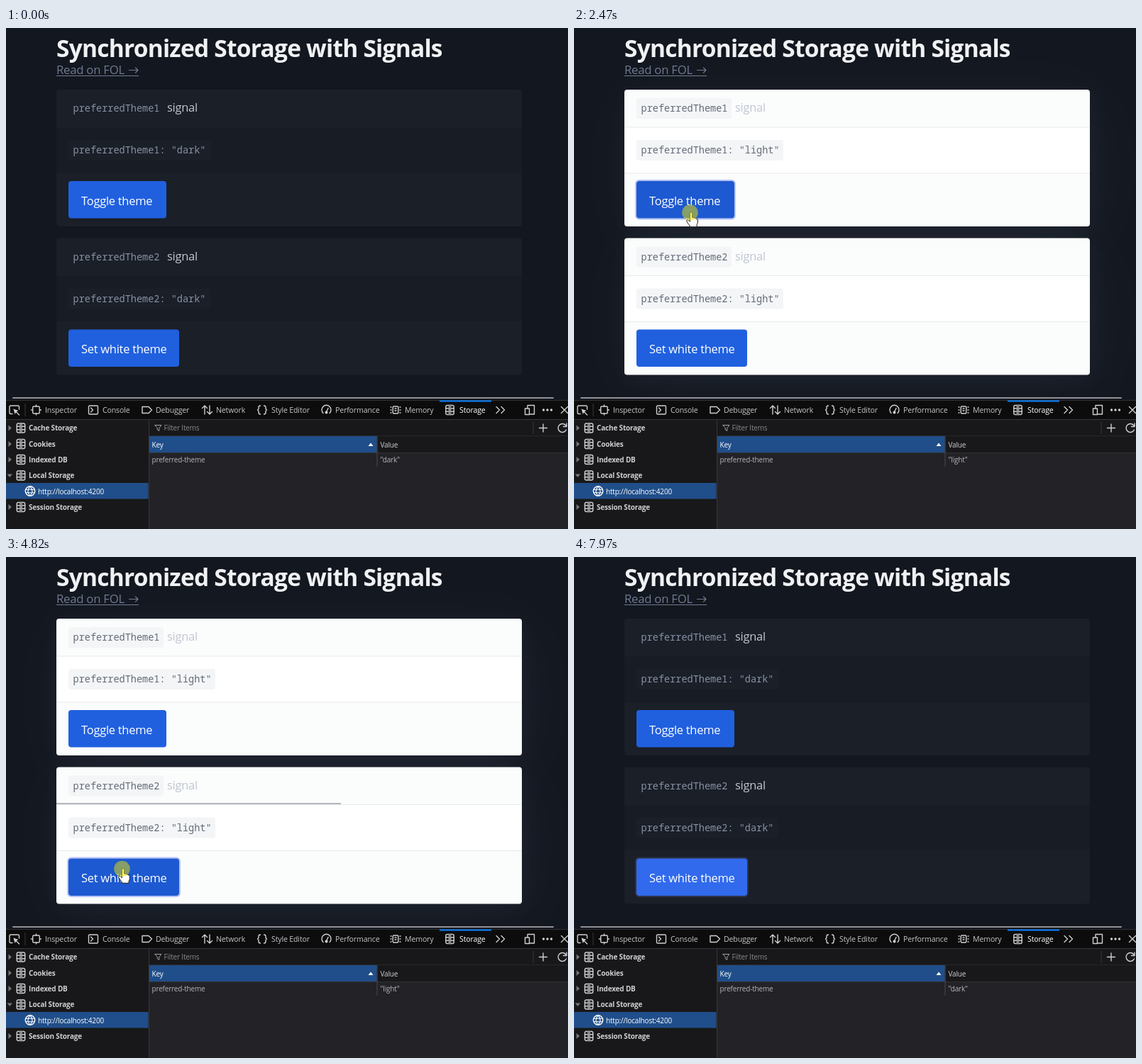
Animation of 792x707 px, one loop 8040 ms. Source, as an HTML page:

```html
<!DOCTYPE html>
<html lang="en">
<head>
<meta charset="utf-8">
<title>Synchronized Storage with Signals</title>
<style>
  html, body { margin: 0; width: 100%; height: 100%; overflow: hidden; background: #13171f; }
  svg { display: block; }
  text { white-space: pre; }
  .ui { font-family: "Open Sans", "Noto Sans", sans-serif; font-size: 16.5px; letter-spacing: -.28px; }
  .title { font-size: 33.5px; font-weight: 700; letter-spacing: -.77px; fill: #f0f1f3; }
  .mono { font-family: "Noto Sans Mono", "DejaVu Sans Mono", monospace; font-size: 13.55px; }
  .tab { font-size: 10.6px; letter-spacing: -.16px; fill: #c6c6c9; }
  .small { font-size: 10px; letter-spacing: -.18px; fill: #b5b5b8; }
  .bold { font-weight: 700; fill: #cfcfd2; }
  .icon { fill: none; stroke: #cfcfd2; stroke-width: 1.4; stroke-linejoin: round; stroke-linecap: round; }
  .solid { fill: #cfcfd2; stroke: none; }
</style>
</head>
<body>
<svg id="stage" width="792" height="707" viewBox="0 0 792 707">
  <defs>
    <filter id="wide" x="-40%" y="-100%" width="180%" height="300%"><feGaussianBlur stdDeviation="48"/></filter>
    <filter id="near" x="-20%" y="-40%" width="140%" height="180%"><feGaussianBlur stdDeviation="16"/></filter>
  </defs>
  <rect width="792" height="707" fill="#13171f"/>
  <g id="page"></g>
  <g id="tools"></g>
  <g id="cursor" stroke="#15171c" stroke-width="1" stroke-linejoin="round" fill="#fff">
    <path id="hand" d="M-1.7 1.7a1.7 1.7 0 0 1 3.4 0V7.6q3-.7 3.2.8q2.2-.5 2.4.9q2-.2 2 1.7V14q0 2-1.2 3.8V20.7H-1.8V19Q-4 16.5-6 13q-.9-2.2.8-2.4q1.2 0 3.5 2.6z"/>
    <path id="arrow" d="M0 0V15.5L3.6 12.2 6 17.5 8.3 16.5 6 11.4H10.8z"/>
  </g>
  <circle id="click" r="11.3" fill="#efe300" fill-opacity=".5"/>
</svg>
<script>
const LOOP = 8040;
const FADE = 200;
const $ = id => document.getElementById(id);
const set = (el, attrs) => { for (const k in attrs) el.setAttribute(k, attrs[k]); };
const show = (el, on) => el.setAttribute('visibility', on ? 'visible' : 'hidden');
const clamp = v => Math.max(0, Math.min(1, v));
const within = (t, spans) => spans.some(([a, b]) => t >= a && t < b);

const text = (x, y, cls, s, extra = '') => `<text x="${x}" y="${y}" class="${cls}" ${extra}>${s}</text>`;
const rect = (x, y, w, h, fill, extra = '') => `<rect x="${x}" y="${y}" width="${w}" height="${h}" fill="${fill}" ${extra}/>`;
const path = (d, cls = 'icon', extra = '') => `<path d="${d}" class="${cls}" ${extra}/>`;
const at = (x, y, content) => `<g transform="translate(${x} ${y})">${content}</g>`;

// Web page
const THEMES = {
  dark: { head: '#1a1f28', body: '#181c25', code: '#1a1f28', ink: '#8891a4', rule: '#1a1f28', signal: '#c2c7d0' },
  light: { head: '#fbfcfc', body: '#ffffff', code: '#f3f5f7', ink: '#646b79', rule: '#e7eaee', signal: '#c0c6d2' }
};

function card(n, y, label, buttonWidth) {
  const name = 'preferredTheme' + n;
  return at(0, y, `
    ${rect(71, 0, 656, 193, '', 'rx="4" data-fill="head"')}
    ${rect(71, 53, 656, 65, '', 'data-fill="body"')}
    ${rect(71, 52.5, 656, 1, '', 'data-fill="rule"')}
    ${rect(71, 117.5, 656, 1, '', 'data-fill="rule"')}
    ${rect(88, 12, 134, 29, '', 'rx="4" data-fill="code"')}
    ${text(94.5, 31, 'mono', name, 'data-fill="ink"')}
    ${text(227, 31, 'ui', 'signal', 'data-fill="signal"')}
    ${rect(88, 71, 200, 29, '', `rx="4" data-fill="code" id="box${n}"`)}
    ${text(94.5, 90, 'mono', '', `data-fill="ink" id="value${n}"`)}
    ${rect(87.1, 128.1, buttonWidth + 1.8, 54.3, 'none', `rx="4.5" stroke-width="2" id="ring${n}"`)}
    ${rect(88, 129, buttonWidth, 52.5, '#2060df', `rx="4" id="button${n}"`)}
    ${text(106, 162.5, 'ui', label, 'fill="#fff"')}`);
}

const glow = y =>
  rect(79, y + 14, 656, 193, '#8191b5', 'opacity=".07" filter="url(#wide)"') +
  rect(74, y + 5, 656, 193, '#8191b5', 'opacity=".06" filter="url(#near)"');

$('page').innerHTML = `
  <g id="glow">${glow(87)}${glow(296.5)}</g>
  ${text(71, 41, 'ui title', 'Synchronized Storage with Signals')}
  ${text(71, 65, 'ui', 'Read on FOL', 'fill="#6f7991" style="font-size:16.8px"')}
  ${path('M173.500 59.500H186M182.500 56L186 59.500L182.500 63', 'icon', 'style="stroke:#6f7991;stroke-width:1.2"')}
  ${rect(71, 67, 116, 1, '#6f7991')}
  ${card(1, 87, 'Toggle theme', 138)}
  ${card(2, 296.5, 'Set white theme', 156)}
  ${rect(71, 347.5, 401, 1, '#6e7278', 'id="streak"')}`;

// Developer tools panel
const disk = '<rect class="icon" x="-5.700" y="-6.500" width="11.400" height="13" rx="2"/>' +
  path('M-5.700-2.200H5.700M-5.700 2.200H5.700M-1.500-4.400H1.500M-1.500 0H1.500M-1.500 4.400H1.500');
const chip = w => `<rect class="icon" x="${-w}" y="-5" width="${2 * w}" height="10" rx="1.500"/>`;

const tabs = [
  [42.5, 55, 'Inspector', chip(4.8) + path('M0-7V-5M0 5V7M-7 0H-5M5 0H7')],
  [123, 136, 'Console', '<rect class="icon" x="-6.500" y="-6" width="13" height="12" rx="1.500"/>' + path('M-3.500-3L-.5 0L-3.500 3')],
  [198.5, 211, 'Debugger', path('M-6.500-4.500H2.500L7 0L2.500 4.500H-6.500Z')],
  [283.5, 296, 'Network', path('M-3.500 6V-6M-7-2.500L-3.500-6L0-2.500M3.500-6V6M0 2.500L3.500 6L7 2.500')],
  [361, 374, 'Style Editor', path('M-2.500-6Q-5-6-5-3.500V-1.500L-6.500 0L-5 1.500V3.500Q-5 6-2.500 6M2.500-6Q5-6 5-3.500V-1.500L6.500 0L5 1.500V3.500Q5 6 2.500 6')],
  [451.5, 464, 'Performance', path('M-4.500 4.500A6.500 6.500 0 1 1 4.500 4.500M0 3L2.500-2.500') + '<circle class="solid" cy="3.500" r="2"/>'],
  [549, 562, 'Memory', chip(3.8) + path('M-7-4H-6M-7 0H-6M-7 4H-6M6-4H7M6 0H7M6 4H7M-1-2H1M-1 1H1')],
  [625.5, 639, 'Storage', disk]
];
const tree = [[564.5, 'Cache Storage'], [587, 'Cookies'], [609, 'Indexed DB'], [631.5, 'Local Storage', true], [676, 'Session Storage']];

$('tools').innerHTML = `
  ${rect(9, 521, 763, 2, '#919196', 'rx="1"')}
  ${rect(0, 525, 792, 28, '#0c0c0d')}
  ${rect(0, 525, 792, 1, '#303034')}
  ${rect(0, 552, 792, 155, '#38383d')}
  ${rect(0, 553, 201, 154, '#18181a')}
  ${rect(202, 553, 590, 22.5, '#18181a')}
  ${rect(202, 576, 590, 131, '#232327')}
  ${rect(202, 576, 320.5, 23, '#204e8a')}
  ${rect(523.5, 576, 269, 23, '#18181a')}
  ${rect(202, 599, 590, 1, '#303034')}
  ${rect(202, 599.5, 590, 19.5, '#4b4620', 'id="flash"')}
  ${rect(522.5, 576, 1, 43, '#48484d')}
  ${rect(611, 525.5, 73, 2, '#0a84ff')}
  ${rect(26.5, 530, 1, 18, '#38383d')}
  ${rect(742.5, 556, 1, 17, '#38383d')}
  ${rect(0, 642, 200.5, 22.5, '#204e8a')}
  ${tabs.map(([ix, tx, label, icon]) => at(ix, 539, icon) +
    text(tx, 543, 'ui tab', label, label === 'Storage' ? 'style="fill:#fff"' : '')).join('')}
  ${at(11.5, 539, path('M7-1V-4.500Q7-6 5.500-6H-5Q-6.500-6-6.500-4.500V4Q-6.500 5.500-5 5.500H-2.500M7 7L2.500 2.500') + path('M-1-1.500L6 1L2.800 2.800L1 6Z', 'solid'))}
  ${path('M691 534.500L695.500 539L691 543.500M698 534.500L702.500 539L698 543.500')}
  ${at(738, 539, path('M-3-2V-6.500H6.500V6H0M-6.500-2H-.5V6.500H-6.500Z'))}
  ${[757.5, 763, 768.5].map(x => `<circle class="solid" cx="${x}" cy="539" r="1.700"/>`).join('')}
  ${path('M782.500 534.500L791.500 543.500M791.500 534.500L782.500 543.500')}
  ${tree.map(([y, label, open]) => path(open ? `M1.500 ${y - 2}H9L5.200 ${y + 2.500}Z` : `M3.500 ${y - 4}V${y + 4}L8 ${y}Z`, '', 'fill="#77777b"') +
    at(21, y, disk) + text(32, y + 3.7, 'ui small bold', label)).join('')}
  ${at(34, 653.5, `<g style="--w:1">${'<circle class="icon" r="6.700" style="stroke:#fff"/>'}
    ${path('M-6.500-2.300H6.500M-6.500 2.300H6.500M0-6.700Q-6 0 0 6.700Q6 0 0-6.700', 'icon', 'style="stroke:#fff;stroke-width:1.1"')}</g>`)}
  ${text(45, 657.5, 'ui small', 'http://localhost:4200', 'style="fill:#fff"')}
  ${path('M210 560.500H219L215.800 564.500V568.500L213.300 567V564.500Z', 'icon', 'style="stroke:#a0a0a4;stroke-width:1"')}
  ${text(222.5, 568.3, 'ui small', 'Filter Items', 'style="fill:#88888d"')}
  ${path('M751.500 564.500H762.500M757 559V570')}
  ${path('M789 561A6 6 0 1 0 789.500 567M790 558V562.500H785.500')}
  ${text(205.5, 592, 'ui small', 'Key', 'style="fill:#fff"')}
  ${path('M510.500 590L514 585.500L517.500 590Z', '', 'fill="#fff"')}
  ${text(527.5, 592, 'ui small', 'Value', 'style="fill:#d0d0d3"')}
  ${text(205.5, 613.3, 'ui small', 'preferred-theme')}
  ${text(527.5, 613.3, 'ui small', '', 'id="stored"')}`;

// Timeline
const LIGHT_PAGE = [[1700, 2610], [4005, 5090]];
const LIGHT_STORED = [[1940, 2800], [4200, 5280]];
const CLICKS = [[1540, 1670], [2400, 2610], [3740, 3880], [4690, 5090]];
const FLASHES = [
  [2200, 2400, .08], [2400, 2470, 1], [3060, 3230, .35], [3230, 3300, 1],
  [4490, 4690, .35], [4690, 4750, 1], [5610, 5750, .35], [5750, 5810, 1]
];

const BASE = [32, 96, 223, 1], HOVER_DARK = [60, 113, 247, 1], HOVER_LIGHT = [29, 89, 208, 1];
const NO_RING = [137, 153, 249, 0], RING_DARK = [137, 153, 249, .375], RING_LIGHT = [116, 139, 248, .5];
const BUTTONS = [
  {
    fill: [[0, BASE], [1540, HOVER_DARK], [1700, HOVER_LIGHT], [2610, HOVER_DARK], [3790, BASE]],
    ring: [[0, NO_RING], [1540, RING_DARK], [1700, RING_LIGHT], [2610, RING_DARK], [3740, NO_RING]]
  },
  {
    fill: [[0, BASE], [3640, HOVER_DARK], [4005, HOVER_LIGHT], [5090, HOVER_DARK], [7890, BASE]],
    ring: [[0, NO_RING], [3740, RING_DARK], [4005, RING_LIGHT], [5090, RING_DARK], [7860, NO_RING]]
  }
];
const MOVES = [
  [0, 478, -30], [185, 478, -12], [650, 115, 200], [870, 165, 260], [3300, 165, 260], [3700, 165, 439.5],
  [5900, 165, 439.5], [6360, 426, 83], [6640, 426, 83], [7100, 483, -9.5], [7430, 483, -9.5], [7500, 484, -30], [LOOP, 484, -30]
];

const mix = (a, b, p) => a + (b - a) * p;

function colorAt(t, stops) {
  const c = stops.reduce((now, [start, next]) => {
    const p = clamp((t - start) / FADE);
    return now.map((v, i) => mix(v, next[i], p));
  }, stops[0][1]);
  return `rgba(${c.slice(0, 3).map(Math.round)},${c[3].toFixed(3)})`;
}

function cursorAt(t) {
  const i = MOVES.findIndex(m => m[0] > t);
  const [t0, x0, y0] = MOVES[i - 1], [t1, x1, y1] = MOVES[i];
  const p = (t - t0) / (t1 - t0), e = p * p * (3 - 2 * p);
  return [mix(x0, x1, e), mix(y0, y1, e)];
}

const themed = [...document.querySelectorAll('[data-fill]')];

function render(t) {
  const theme = within(t, LIGHT_PAGE) ? 'light' : 'dark';
  for (const el of themed) el.setAttribute('fill', THEMES[theme][el.dataset.fill]);
  show($('glow'), theme === 'light');
  show($('streak'), within(t, [[4200, 5090]]));
  BUTTONS.forEach(({ fill, ring }, i) => {
    const n = i + 1;
    $('value' + n).textContent = `preferredTheme${n}: "${theme}"`;
    set($('box' + n), { width: theme === 'light' ? 207 : 200 });
    set($('button' + n), { fill: colorAt(t, fill) });
    set($('ring' + n), { stroke: colorAt(t, ring) });
  });

  $('stored').textContent = within(t, LIGHT_STORED) ? '"light"' : '"dark"';
  const flash = FLASHES.find(([a, b]) => t >= a && t < b);
  set($('flash'), { opacity: flash ? flash[2] : 0 });

  const [x, y] = cursorAt(t);
  const overButton = x > 88 && ((x < 226 && y > 216 && y < 269) || (x < 244 && y > 425 && y < 478));
  set($('cursor'), { transform: `translate(${x} ${y})` });
  show($('hand'), overButton);
  show($('arrow'), !overButton);
  set($('click'), { cx: x - 1.5, cy: y + .5 });
  show($('click'), within(t, CLICKS));
}

const start = performance.now();
function tick() {
  render((performance.now() - start) % LOOP);
  requestAnimationFrame(tick);
}
tick();
</script>
</body>
</html>
```
